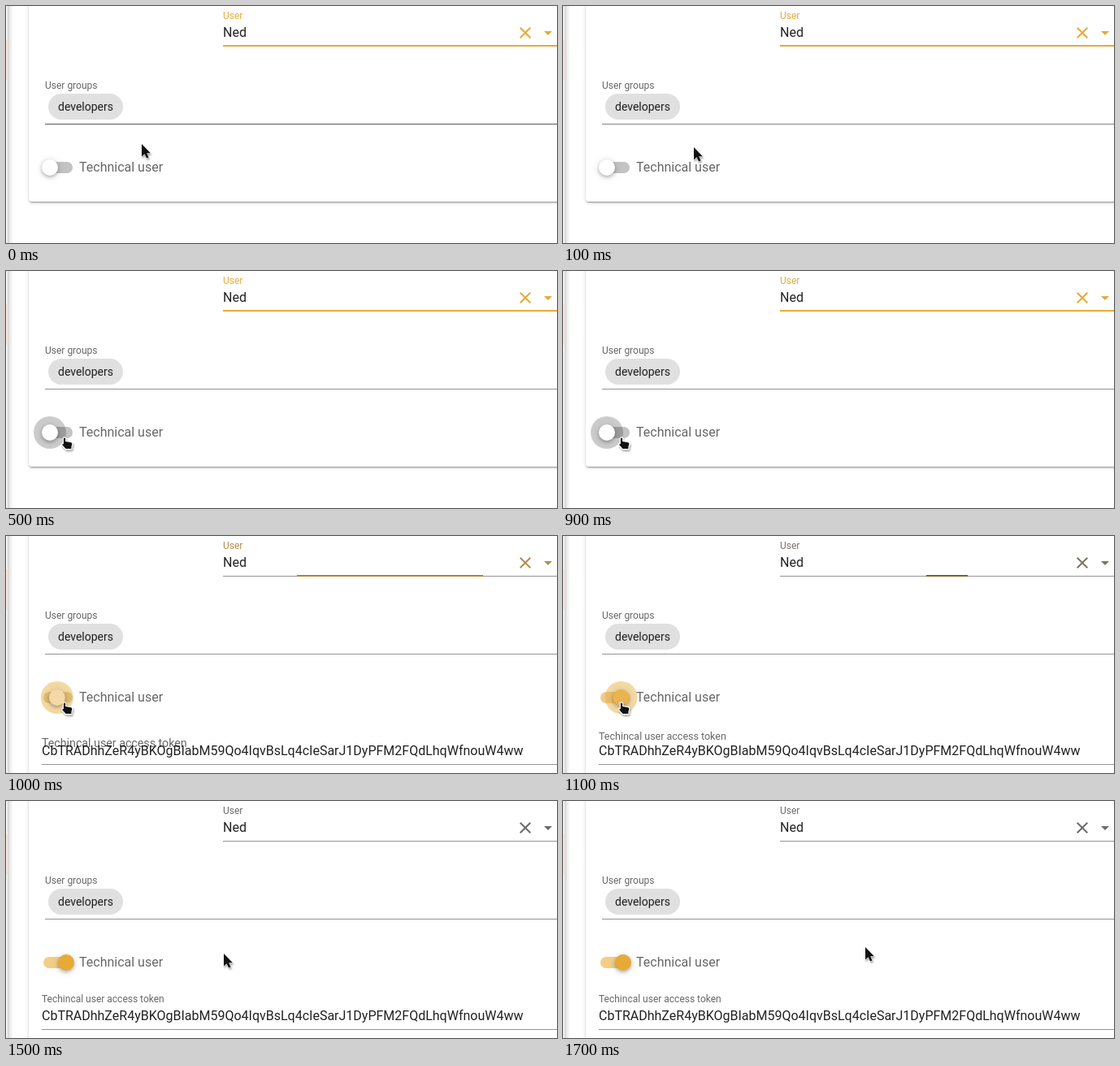
These frames come from a looping animation (678x292 px, 2900 ms). An HTML page:

```html
<!DOCTYPE html>
<html lang="en">
<head>
<meta charset="utf-8">
<title>Technical user switch</title>
<style>
html, body { margin: 0; width: 100%; height: 100%; overflow: hidden; background: #fff; }
#stage { position: relative; width: 100%; height: 100%; overflow: hidden; contain: strict; }
#drawer { position: absolute; left: 0; top: 0; width: 9px; height: 100%;
  background: linear-gradient(90deg, #f3f1f0 0 2px, #d2d2d2 2px, #ececec 5px, #fff 9px); }
#drawer::after { content: ""; position: absolute; top: 41px; width: 2px; height: 50px; background: #f8e6da; }
#card { position: absolute; left: 28px; right: -20px; top: -20px; background: #fff; border-radius: 4px;
  box-shadow: 0 3px 1px -2px rgba(0,0,0,.2), 0 2px 2px rgba(0,0,0,.14), 0 1px 5px rgba(0,0,0,.12); }
svg { position: absolute; left: 0; top: 0; overflow: hidden; }
text { font: 16px Roboto, sans-serif; fill: rgba(0,0,0,.87); white-space: pre; }
text.small { font-size: 12px; }
text.soft { fill: rgba(0,0,0,.6); }
.rule { fill: #949494; height: 1px; }
#thumb { filter: drop-shadow(0 2px 2px rgba(0,0,0,.24)) drop-shadow(0 1px 4px rgba(0,0,0,.14)); }
#cursor { filter: drop-shadow(1px 2px 1px rgba(0,0,0,.35)); }
#cursor path { fill: #111; stroke: #fff; paint-order: stroke; stroke-linejoin: round; }
#hand { stroke-width: 2.4; }
</style>
</head>
<body>
<div id="stage">
<div id="drawer"></div>
<div id="card"></div>
<svg width="678" height="292">
  <text id="label" class="small" x="267" y="16">User</text>
  <text x="267" y="38">Ned</text>
  <g id="icons">
    <path transform="translate(627 21)" d="M19 6.4L17.6 5 12 10.6 6.4 5 5 6.4 10.6 12 5 17.6 6.4 19 12 13.4 17.6 19 19 17.6 13.4 12z"/>
    <path d="M662 31h10l-5 5z"/>
  </g>
  <rect class="rule" x="267" y="49" width="411"/>
  <rect id="focus" y="48" height="2"/>

  <text class="small soft" x="48" y="102">User groups</text>
  <rect x="52" y="108" width="92" height="32" rx="16" fill="#e0e0e0"/>
  <text x="64" y="129" style="font-size:14px">developers</text>
  <rect id="groups" class="rule" x="48" y="145" width="630"/>

  <rect id="track" x="46" y="192" width="36" height="14" rx="7"/>
  <circle id="ripple" cy="199"/>
  <circle id="thumb" cy="199" r="10"/>
  <text class="soft" x="90" y="204">Technical user</text>

  <g id="token">
    <text id="tokenLabel" class="soft" x="44">Techincal user access token</text>
    <text x="44" y="270">CbTRADhhZeR4yBKOgBIabM59Qo4IqvBsLq4cIeSarJ1DyPFM2FQdLhqWfnouW4ww</text>
    <rect class="rule" x="44" y="281" width="634"/>
  </g>

  <g id="cursor">
    <path id="arrow" d="M0 0V15.5L3.6 12.2 6 17.6 8.5 16.5 6.2 11.2H10.8Z"/>
    <path id="hand" d="M.9 1.2Q2 -.2 3.1 1.2V5L10 6.2Q11.5 6.7 11.3 8.6L10.4 11.5V14H3.6L-.5 9.4Q-1 7.6 .9 8.2Z"/>
  </g>
</svg>
</div>
<script>
const LOOP = 2900, STEP = 100, TOGGLE = 950, FADE = 300;
const ORANGE = [231, 170, 55], GREY = [108, 108, 108], WHITE = [255, 255, 255], BLACK = [0, 0, 0];
const $ = id => document.getElementById(id);
const set = (id, attrs) => { for (const k in attrs) $(id).setAttribute(k, attrs[k]); };
const clamp = v => Math.min(1, Math.max(0, v));
const lerp = (a, b, p) => a + (b - a) * p;
const mix = (a, b, p) => `rgb(${a.map((v, i) => Math.round(lerp(v, b[i], p)))})`;

// cubic-bezier(.25, .8, .5, 1), solved by bisection
function ease(x) {
  x = clamp(x);
  const curve = (a, b, s) => 3 * a * s * (1 - s) ** 2 + 3 * b * s * s * (1 - s) + s ** 3;
  let lo = 0, hi = 1;
  for (let i = 0; i < 24; i++) {
    const mid = (lo + hi) / 2;
    if (curve(.25, .5, mid) < x) lo = mid; else hi = mid;
  }
  return curve(.8, 1, lo);
}

// pointer path: time, x, y
const path = [
  [0, 167, 170], [100, 161, 174], [200, 132, 187], [300, 102, 198], [400, 80, 203], [500, 70, 205],
  [1100, 70, 205], [1200, 98, 204], [1300, 142, 203], [1400, 205, 194],
  [1500, 268, 188], [1600, 332, 183], [1700, 372, 180], [LOOP, 372, 180]
];
function pointer(t) {
  const i = path.findIndex(k => k[0] > t), a = path[i - 1], b = path[i];
  const p = (t - a[0]) / (b[0] - a[0]);
  return [lerp(a[1], b[1], p), lerp(a[2], b[2], p)];
}

function draw(time) {
  const t = Math.floor(time % LOOP / STEP) * STEP;
  const p = ease((t - TOGGLE) / FADE), on = t >= TOGGLE;

  $("card").style.height = (on ? 400 : 261) + "px";
  $("label").style.fill = $("icons").style.fill = mix(ORANGE, GREY, p);
  const half = 205.5 * (1 - p);
  set("focus", { x: 472.5 - half, width: 2 * half, fill: mix(ORANGE, BLACK, p * .5) });
  $("groups").style.fill = mix([92, 92, 92], [148, 148, 148], ease(t / FADE));

  const cx = lerp(54, 74, p), shown = ease((t - 350) / 150) - ease((t - 1150) / 120);
  set("track", { fill: mix([195, 195, 195], [243, 206, 136], p) });
  set("thumb", { cx, fill: mix(WHITE, ORANGE, p) });
  set("ripple", { cx, r: lerp(4, 20, shown), fill: mix(on ? ORANGE : BLACK, BLACK, 0),
    opacity: shown * (on ? .45 : .2) });

  $("token").style.display = on ? "" : "none";
  $("tokenLabel").style.fontSize = lerp(16, 12, p) + "px";
  set("tokenLabel", { y: lerp(270, 248, p) });

  const [x, y] = pointer(t), hand = x < 195 && y > 194;
  set("cursor", { transform: `translate(${x} ${y})` });
  $("hand").style.display = hand ? "" : "none";
  $("arrow").style.display = hand ? "none" : "";
}

const start = performance.now();
function tick() {
  draw(performance.now() - start);
  requestAnimationFrame(tick);
}
tick();
</script>
</body>
</html>
```
